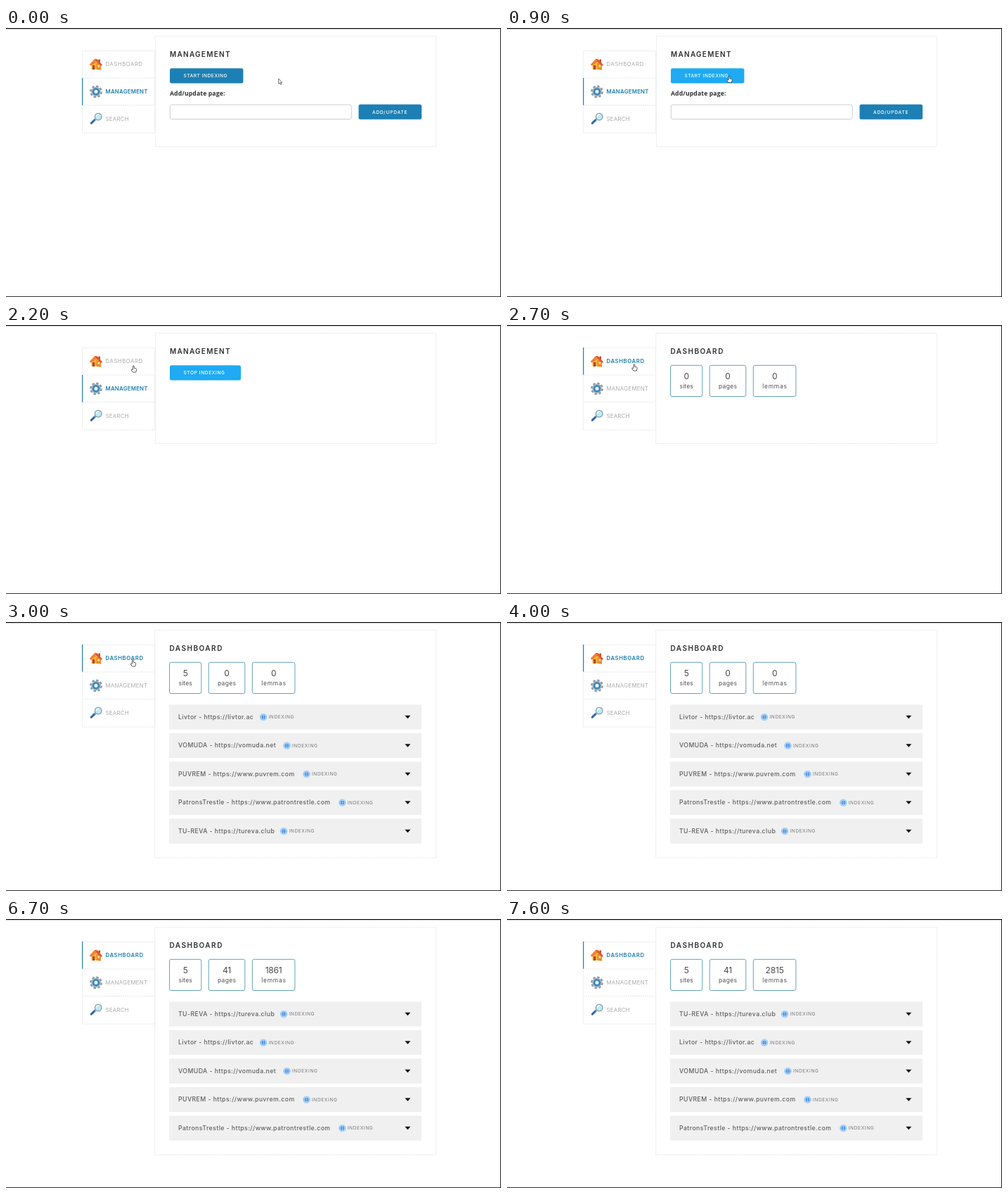
An HTML page for the animation above (8000 ms loop, 704 px wide and 382 px high).

```html
<!DOCTYPE html>
<html lang="en">
<head>
<meta charset="utf-8">
<title>Search engine admin</title>
<style>
  html, body { margin: 0; width: 100%; height: 100%; overflow: hidden; background: #fff; }
  svg { display: block; width: 704px; height: 382px; font-family: Inter, "Open Sans", sans-serif; }
</style>
</head>
<body>
<svg id="stage" viewBox="0 0 704 382"></svg>
<script>
const LOOP = 8000, STEP = 100;
const BLUE = [28, 128, 180], BRIGHT = [31, 170, 243];
const stage = document.getElementById('stage');

const clamp = v => Math.max(0, Math.min(1, v));
const part = (t, from, to) => clamp((t - from) / (to - from));
const mix = (a, b, p) => a + (b - a) * p;
const rgb = p => `rgb(${BLUE.map((c, i) => Math.round(mix(c, BRIGHT[i], p)))})`;

const text = (x, y, s, size, fill, weight = 400, gap = 0, extra = '') =>
  `<text x="${x}" y="${y}" font-size="${size}" fill="${fill}" font-weight="${weight}" letter-spacing="${gap}" ${extra}>${s}</text>`;
const rect = (x, y, w, h, fill, extra = '') =>
  `<rect x="${x}" y="${y}" width="${w}" height="${h}" fill="${fill}" ${extra}/>`;
const path = (d, fill, extra = '') => `<path d="${d}" fill="${fill}" ${extra}/>`;
const DASH = 'stroke="#e1e3e5" stroke-width=".8" stroke-dasharray="2 1"';

const house =
  path('M121.5 51L128 46L135 51V59.5L128.5 58.5L121.5 59Z', '#f8b53c') +
  path('M128.5 50L135 50V59.5L128.5 59Z', '#ef8a2c') +
  path('M131.5 44.5H134V49H131.5Z', '#b8502a') +
  path('M119 52L126.5 43.8L130 44.5L137 52.5L135 54L128.5 47.5L121 53.5Z', '#e2562c') +
  path('M119 52L126.5 43.8L128.5 47.5L121 53.5Z', '#f58232') +
  path('M123 53H126.3V59H123Z', '#a84e24') +
  path('M130.5 52.5H133.3V55.5H130.5Z', '#fbe3a0');

const gear =
  '<circle cx="128" cy="90.4" r="7.6" fill="none" stroke="#8b99a5" stroke-width="2.6" stroke-dasharray="3.4 2.57"/>' +
  '<circle cx="128" cy="90.4" r="5.6" fill="#4d9fd2" stroke="#a3b0ba" stroke-width="2.4"/>' +
  '<circle cx="128" cy="90.4" r="4.2" fill="none" stroke="#2f7fb8" stroke-width="1.5"/>' +
  '<circle cx="128" cy="90.4" r="2.4" fill="#f2f7fa"/>';

const lens =
  path('M121.3 135.2L126.6 130.2', 'none', 'stroke="#2c66b4" stroke-width="3" stroke-linecap="round"') +
  path('M126 130.8L128 129', 'none', 'stroke="#9aa7ae" stroke-width="1.6"') +
  '<circle cx="131.2" cy="126" r="4.8" fill="#bfeaf0" stroke="#8fa9b4" stroke-width="1.5"/>' +
  path('M128.2 125.5Q129 122.8 132 122.8', 'none', 'stroke="#fff" stroke-width="1.2"');

function menu(dash) {
  const item = (y, s, on, gap, gapOn) =>
    text(141.5, y, s, 7.8, on ? '#1d7fae' : '#a9abad', on ? 600 : 400, on ? gapOn : gap);
  return rect(108.5, 32.5, 103, 116.5, 'none', DASH) +
    path('M109 71H212M109 109.5H212', 'none', DASH) +
    rect(108, dash ? 32 : 71, 1.3, 38.6, '#2f83a8') +
    house + gear + lens +
    item(54, 'DASHBOARD', dash, .54, .57) +
    item(92.8, 'MANAGEMENT', !dash, .33, .25) +
    item(131.6, 'SEARCH', false, .3);
}

const button = (x, y, w, label, tx, gap, fill) =>
  rect(x, y, w, 21.3, fill, 'rx="2.5"') + text(tx, y + 13.1, label, 6.6, '#fff', 500, gap);

function management(t) {
  const head = rect(212.5, 11.7, 399, 156.8, '#fff', DASH) +
    text(233, 41, 'MANAGEMENT', 10, '#2c2e30', 600, 1.28);
  if (t >= 1300) return head + button(233, 57.2, 101, 'STOP INDEXING', 252.5, .6, rgb(1));
  return head +
    button(233, 57.2, 104.4, 'START INDEXING', 252.5, .54, rgb(part(t, 600, 900))) +
    text(233, 96, 'Add/update page:', 8.6, '#2c2e30', 700, .15, 'font-family="Open Sans, sans-serif"') +
    rect(233.3, 109, 257.9, 20.4, '#fff', 'rx="2.5" stroke="#c6c9cb" stroke-width=".9"') +
    button(501.5, 108.4, 89.6, 'ADD/UPDATE', 521, .79, rgb(0));
}

const sites = [
  ['Livtor - https://livtor.ac', 366],
  ['VOMUDA - https://vomuda.net', 399.5],
  ['PUVREM - https://www.puvrem.com', 427.5],
  ['PatronsTrestle - https://www.patrontrestle.com', 478.3],
  ['TU-REVA - https://tureva.club', 395]
];

function row([name, x], i) {
  const y = 117.4 + 40.5 * i, c = y + 17.6;
  return rect(232, y, 359, 35.2, '#f0f0f0') +
    text(245, c + 2.6, name, 8.7, '#5c5e60', 500, .45) +
    `<circle cx="${x}" cy="${c}" r="5.3" fill="#a9d0f6"/>` +
    path(`M${x - 1.3} ${c - 2.6}v5.2M${x + 1.3} ${c - 2.6}v5.2`, 'none', 'stroke="#2f7fdc" stroke-width="1.3"') +
    path(`M${x - 3.4} ${c - 1.2}v2.4M${x + 3.4} ${c - 1.2}v2.4`, 'none', 'stroke="#6aaaf0" stroke-width=".9"') +
    text(x + 7.4, c + 2.4, 'INDEXING', 6.6, '#77797b', 400, .63) +
    path(`M567.3 ${c - 2.2}h8l-4 4.4z`, '#111');
}

function stat(x, w, value, label, gap) {
  const mid = 'text-anchor="middle"', c = x + w / 2;
  return rect(x, 57.3, w, 44.2, '#fff', 'rx="2.5" stroke="#5b9fb4" stroke-width=".95"') +
    text(c, 76.6, value, 12, '#48494b', 400, -.2, mid) +
    text(c + gap / 2, 89.6, label, 8.5, '#505254', 400, gap, mid);
}

const lemmas = [[7600, 2815], [7200, 2306], [6700, 1861], [6400, 1547], [5900, 1082], [0, 0]];

function dashboard(t) {
  const loaded = t >= 3000, found = t >= 5900;
  const order = found ? [sites[4], ...sites.slice(0, 4)] : sites;
  return rect(211.7, 11.7, 399.8, loaded ? 323.2 : 156.8, '#fff', DASH) +
    text(232.5, 41, 'DASHBOARD', 10, '#2c2e30', 600, 1.5) +
    stat(232.5, 45.3, loaded ? 5 : 0, 'sites', .1) +
    stat(288.2, 51.6, found ? 41 : 0, 'pages', .3) +
    stat(350.3, 60.6, lemmas.find(l => t >= l[0])[1], 'lemmas', .7) +
    (loaded ? order.map(row).join('') : '');
}

const arrow = path('M0 0V7.2L1.7 5.7L2.9 8.3L4 7.8L2.9 5.3H5Z', '#fff', 'stroke="#333" stroke-width=".7"');
const hand = path('M-.9 6V.8Q0 -.4 .9 .8V3.8L3.6 4.5Q4.4 4.8 4.2 6L3.4 9.6H-1L-3.2 6.4Q-3 5 -1.8 5.8Z',
  '#fff', 'stroke="#333" stroke-width=".8" stroke-linejoin="round"');

function cursor(t) {
  if (t >= 4000) return '';
  const a = 1 - (1 - part(t, 500, 900)) ** 2;
  const p = part(t, 1500, 2200), b = p * p * (3 - 2 * p);
  const c = part(t, 2600, 2800), d = part(t, 3400, 4000);
  const x = 387.7 - 71.7 * a - 134.6 * b - c;
  const y = 72 - 4 * a - 10.6 * b - 4 * c - 36 * d;
  const overButton = x > 233 && x < 337 && y > 57;
  const overMenu = x < 212 && y > 32;
  return `<g transform="translate(${x} ${y})">${overButton || overMenu ? hand : arrow}</g>`;
}

function draw(now) {
  const t = Math.floor(now % LOOP / STEP) * STEP;
  const dash = t >= 2700;
  stage.innerHTML = rect(0, 0, 704, 382, '#fff') +
    menu(dash) + (dash ? dashboard(t) : management(t)) +
    rect(0, 0, 704, 1.3, '#111') + rect(703, 0, 1, 382, '#222') + rect(0, 381, 704, 1, '#333') +
    cursor(t);
}

let shown = -1;
const start = performance.now();
function tick() {
  const now = performance.now() - start, step = Math.floor(now / STEP);
  if (step !== shown) draw(now);
  shown = step;
  requestAnimationFrame(tick);
}
tick();
</script>
</body>
</html>
```
